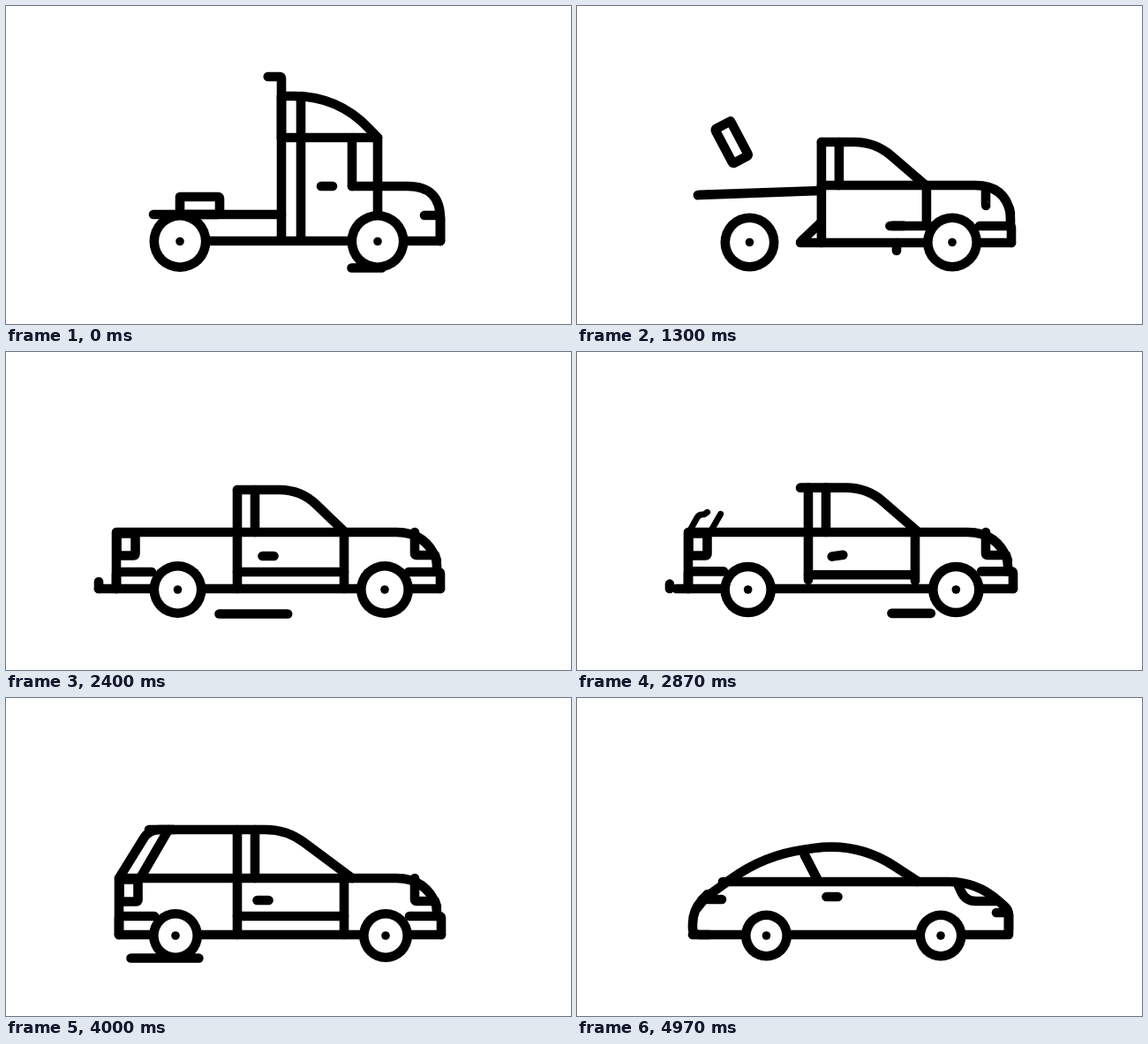
Write an HTML page with a canvas that moves like this. It is 640x360 px and loops after 5 s.

```html
<!DOCTYPE html>
<html lang="en">
<head>
<meta charset="utf-8">
<title>Morphing vehicles</title>
<style>
html, body { margin: 0; width: 100%; height: 100%; overflow: hidden; background: #fff; }
canvas { display: block; }
</style>
</head>
<body>
<canvas id="stage" width="640" height="360"></canvas>
<script>
const ctx = document.getElementById('stage').getContext('2d');
const LOOP = 5000, LINE = 10.6, CYCLE = 700, FLOOR = 268;

// A path is a list of [x, y, corner radius] points.
const flat = (x1, x2, y) => [[x1, y], [x2, y]];
const upright = (x, y1, y2) => [[x, y1], [x, y2]];

function turned(x, y, points, degrees) {
  const a = degrees * Math.PI / 180, c = Math.cos(a), s = Math.sin(a);
  return points.map(([u, v]) => [x + u * c - v * s, y + u * s + v * c]);
}

function rect(x, y, w, h, degrees = 0) {
  const u = w / 2, v = h / 2;
  return turned(x, y, [[-u, -v], [u, -v], [u, v], [-u, v], [-u, -v]], degrees);
}

const handle = (x, y, degrees = 0) => turned(x, y, [[-6.5, 0], [6.5, 0]], degrees);
const wheels = (rear, front, y, r) => [[rear, y, r], [front, y, r]];

// Shell of a car, built from its main dimensions.
function body({ rear, cab, roof, glass, nose, front, belt, top, bump = 249,
                eave = 0, bow = 24, swoop = 12, curve = 34, hitch = 0 }) {
  return {
    bed: [[rear, FLOOR], [rear, belt, 8], [rear, belt], [cab, belt]],
    base: flat(rear - hitch, front, FLOOR),
    cab: [[cab - eave, top], [cab - eave, top], [roof, top, bow], [glass, belt]],
    post: upright(cab, top, FLOOR),
    pillar: upright(cab + 20, top, belt),
    belt: flat(cab, glass, belt),
    hood: [[glass, belt], [nose - swoop, belt, curve], [nose, belt + 32, 6], [nose, bump]]
  };
}

// Bumpers, lights and door of a car.
function trim({ rear, cab, nose, front, belt, bump = 249 }) {
  const low = belt + 26;
  return {
    box: rect(rear + 11, belt + 14, 25, 21, 90),
    door: upright(383, belt, FLOOR),
    nose: [[front - 36, bump], [front, bump], [front, FLOOR]],
    tail: [[rear + 40, bump], [rear, bump], [rear, FLOOR]],
    sill: flat(cab, 383, bump),
    lamp: [[463, belt], [463, low], [nose - 2, low]]
  };
}

const truck = {
  wheels: wheels(197, 421, 266.5, 34.5),
  stack: [[312, 150], [312, 80], [297, 80]],
  bed: [[167, 236], [167, 236], [167, 236], [312, 236]],
  base: flat(215, 492, 266),
  box: rect(219.5, 226, 45, 20),
  cab: [[312, 102], [312, 102], [376, 102, 50], [421, 149]],
  post: upright(312, 102, 265),
  pillar: upright(334, 102, 265),
  belt: flat(312, 421, 149),
  door: upright(421, 149, 235),
  rail: upright(392, 149, 204),
  hood: [[392, 204], [492, 204, 37], [492, 245], [492, 266]],
  nose: [[474, 237], [492, 237], [492, 266]],
  handle: handle(363.5, 204)
};

const flightSize = { rear: 137, cab: 277, roof: 338, glass: 395, nose: 491, front: 492,
                     belt: 203, top: 154, swoop: 6 };
const flight = {
  ...body(flightSize), ...trim(flightSize),
  wheels: wheels(195.5, 425, 267.5, 33),
  bed: [[137, 214], [137, 214], [137, 214], [277, 209]],
  base: flat(254, 492, FLOOR),
  box: rect(175.5, 154, 44, 20, 62),
  door: upright(396, 204, 245),
  tail: [[277, 245], [254, 267], [254, 267]],
  sill: flat(355, 395, 249),
  lamp: [[463, 206], [463, 226], [463, 226]],
  handle: handle(364, 249),
  nub: upright(362, 268, 277)
};

const pickupSize = { rear: 125, cab: 262, roof: 334, glass: 384, nose: 488, front: 492,
                     belt: 204, top: 156, hitch: 20 };
const pickup = {
  ...body(pickupSize), ...trim(pickupSize),
  wheels: wheels(194.5, 429, 269, 32),
  hook: upright(105, FLOOR, 260),
  handle: handle(297, 231)
};

const openSize = { rear: 128, cab: 262, roof: 318, glass: 392, nose: 488, front: 498,
                   belt: 204, top: 149, eave: 27, bump: 247 };
const opening = {
  ...body(openSize), ...trim(openSize),
  wheels: wheels(192, 430, 269, 30),
  gate: [[128, 202], [158, 148, 8], [176, 148], [187, 140]],
  glass: [[152, 202], [184, 146]],
  post: upright(262, 149, 238),
  door: upright(383, 204, 242),
  sill: flat(262, 382, 259),
  handle: handle(291, 230, -25)
};

const wagonSize = { ...openSize, front: 493, eave: 100 };
const wagon = {
  ...body(wagonSize), ...trim(wagonSize),
  wheels: opening.wheels,
  gate: [[128, 204], [162, 149, 12], [176, 149], [190, 149]],
  glass: [[152, 204], [184, 149]],
  handle: handle(291, 229)
};

const hatch = {
  ...body({ rear: 166, cab: 261, roof: 300, glass: 390, nose: 454, front: 454, belt: 186,
            top: 122, bump: FLOOR, bow: 8, swoop: 0, curve: 20 }),
  wheels: wheels(227, 401, 269, 28.5),
  cab: [[167, 192], [205, 122, 14], [300, 122, 8], [390, 186]],
  post: upright(261, 124, 186),
  handle: handle(289, 225)
};

const sports = {
  ...body({ rear: 131, cab: 165, roof: 318, glass: 385, nose: 489, front: 486, belt: 208,
            top: 163, bump: FLOOR, swoop: 36, curve: 32 }),
  wheels: wheels(214.5, 412, 269, 28.5),
  bed: [[150, FLOOR], [131, FLOOR, 8], [131, 240, 16], [148, 222]],
  cab: [[141, 229], [212, 178, 45], [318, 163, 50], [385, 207]],
  post: [[258, 178], [272, 205]],
  pillar: [[258, 178], [272, 205]],
  nose: [[475, 243], [489, 243], [489, 262]],
  tail: [[164, 228], [144, 228], [136, 238]],
  lamp: [[431, 210], [440, 230, 12], [475, 230]],
  handle: handle(289, 225)
};

const linear = u => u;
const easeIn = u => u * u;
const easeOut = u => 1 - (1 - u) * (1 - u);
const easeBoth = u => u * u * (3 - 2 * u);

// [time, pose, easing used on the way there]
const keys = [
  [0, truck, linear], [1100, truck, linear],
  [1300, flight, easeIn], [1640, pickup, easeOut],
  [2620, pickup, linear], [3270, opening, easeBoth],
  [3600, wagon, easeBoth], [4150, wagon, linear],
  [4450, hatch, easeBoth], [4570, hatch, linear],
  [4850, sports, easeBoth], [LOOP, sports, linear]
].map(([at, pose, ease]) => ({ at, pose, ease }));

const mix = (a, b, u) => a + (b - a) * u;
const collapse = path => path.map(() => path[0]);

function blend(p, q, u) {
  return p.map(([x, y, r = 2], i) => {
    const [x2, y2, r2 = 2] = q[i];
    return [mix(x, x2, u), mix(y, y2, u), mix(r, r2, u)];
  });
}

function stroke(path, width) {
  const last = path.length - 1;
  ctx.lineWidth = width;
  ctx.beginPath();
  ctx.moveTo(path[0][0], path[0][1]);
  for (let i = 1; i < last; i++) {
    const [x, y, r] = path[i];
    const near = q => {
      const d = Math.hypot(q[0] - x, q[1] - y) || 1;
      const k = Math.min(r / d, 1);
      return [mix(x, q[0], k), mix(y, q[1], k)];
    };
    ctx.lineTo(...near(path[i - 1]));
    ctx.quadraticCurveTo(x, y, ...near(path[i + 1]));
  }
  ctx.lineTo(path[last][0], path[last][1]);
  ctx.stroke();
}

function dot(x, y, r) {
  ctx.beginPath();
  ctx.arc(x, y, r, 0, Math.PI * 2);
  ctx.fill();
}

function wheel([x, y, r]) {
  ctx.fillStyle = '#000';
  dot(x, y, r);
  ctx.fillStyle = '#fff';
  dot(x, y, r - LINE);
  ctx.fillStyle = '#000';
  dot(x, y, 4.8);
}

function smoke(phase) {
  for (let k = 0; k < 3; k++) {
    const age = phase - k * 60;
    if (age < 0 || age > 380) continue;
    dot(297 - 0.45 * age, 80, 5 * Math.min(1, (380 - age) / 60));
  }
}

// A dash slips out behind the front wheel, stretches and runs out at the rear.
function road(phase, y) {
  const p = phase > 640 ? phase - CYCLE : phase;
  if (p > 570) return;
  const head = Math.max(128, 392 - 0.5 * p);
  let tail = 426 - 0.355 * Math.max(0, p);
  if (p > 470) tail = mix(259, 128, (p - 470) / 100);
  stroke(flat(head, Math.max(head, tail), y), LINE);
}

function draw(t) {
  ctx.fillStyle = '#fff';
  ctx.fillRect(0, 0, 640, 360);
  ctx.fillStyle = ctx.strokeStyle = '#000';
  ctx.lineCap = ctx.lineJoin = 'round';

  let i = 0;
  while (i < keys.length - 2 && t >= keys[i + 1].at) i++;
  const a = keys[i], b = keys[i + 1];
  const u = b.ease((t - a.at) / (b.at - a.at));
  const phase = t % CYCLE;
  const calm = Math.max(0, Math.min(1, (1300 - t) / 200));
  const bob = 3 * (1 - Math.cos(t * Math.PI * 3 / 800)) * calm;

  const pair = blend(a.pose.wheels, b.pose.wheels, u);
  if (t < 4200) road(phase, pair[0][1] + pair[0][2] - 4.5);

  for (const name in { ...a.pose, ...b.pose }) {
    if (name === 'wheels') continue;
    const from = a.pose[name], to = b.pose[name];
    const path = blend(from || collapse(to), to || collapse(from), u);
    const grow = from && to ? 1 : Math.min(1, 2 * (from ? 1 - u : u));
    if (grow <= 0) continue;
    if (name !== 'stack' && name !== 'box') {
      for (const p of path) if (p[1] > 100 && p[1] < 156) p[1] -= bob;
    }
    stroke(path, LINE * grow);
  }

  pair.forEach(wheel);
  if (t < 1130) smoke(phase);
}

const start = performance.now();
function tick() {
  draw((performance.now() - start) % LOOP);
  requestAnimationFrame(tick);
}
tick();
</script>
</body>
</html>
```
